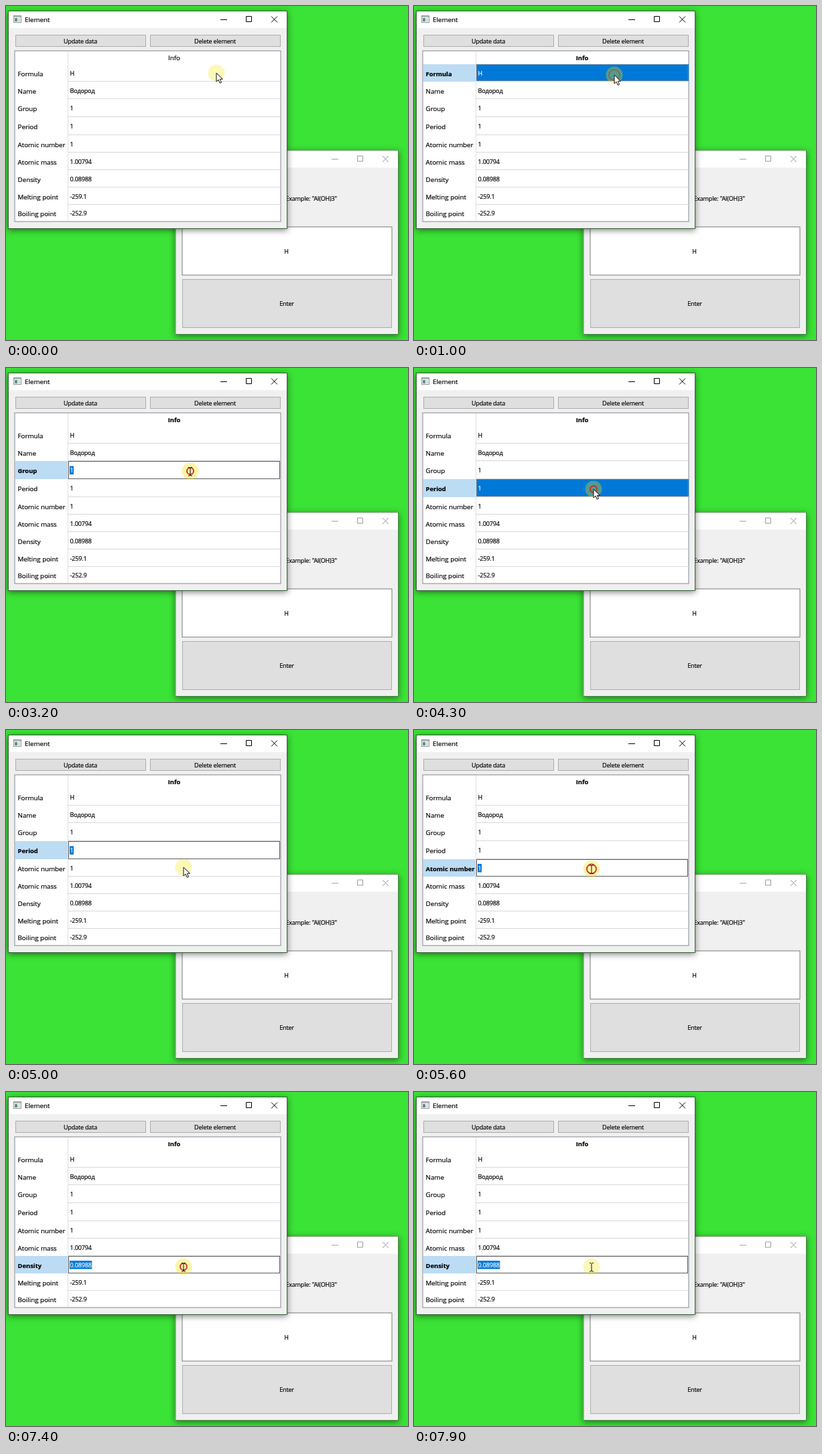
Recreate the animation shown at these times as an HTML page. Size 600 by 499 pixels, loop 8 s.

```html
<!DOCTYPE html>
<html lang="en">
<head>
<meta charset="utf-8">
<title>Element</title>
<style>
  html, body { margin: 0; width: 100%; height: 100%; overflow: hidden; background: #3ae335; }
  svg { display: block; width: 600px; height: 499px; }
  text {
    font: 9px "Open Sans", "Noto Sans", sans-serif; letter-spacing: -.15px; white-space: pre;
    color: #000; fill: currentColor; stroke: currentColor; stroke-width: .2px;
  }
  .head { font-size: 9.8px; letter-spacing: 0; }
  .head.bold { font-size: 9.4px; font-weight: 700; }
  .mid { text-anchor: middle; }
  .end { text-anchor: end; }
  .shadow { filter: drop-shadow(0 2px 5px rgba(0, 0, 0, .5)); }
</style>
</head>
<body>
<svg id="stage" viewBox="0 0 600 499"></svg>
<script>
const LOOP = 8000, STEP = 100, RING_TIME = 500;
const BLUE = '#0078d7';
const edges = [87, 113, 139, 166, 193, 219, 245, 271, 297, 322];
const rows = [
  ['Formula', 'H'], ['Name', 'Водород'], ['Group', '1'], ['Period', '1'],
  ['Atomic number', '1'], ['Atomic mass', '1.00794'], ['Density', '0.08988'],
  ['Melting point', '-259.1'], ['Boiling point', '-252.9']
];
// Per row: time of the selecting click, time of the click that opens the editor
const clicks = [[600, 1100], [1800, 2000], [2900, 3100], [4200, 4400], [5100, 5300], [6100, 6300], [7100, 7300]];
// Pointer path: time, x, y
const path = [
  [0, 314, 100], [500, 299, 103], [1200, 299, 103], [1700, 285, 127], [2300, 285, 127],
  [2800, 275, 154], [3400, 275, 154], [4000, 268, 181], [4500, 268, 181],
  [5000, 265, 205], [5500, 265, 205], [6000, 264.5, 229.5], [6600, 264.5, 229.5],
  [7000, 265, 261], [8000, 265, 261]
];

const stage = document.getElementById('stage');

function add(parent, tag, attrs = {}, text = '') {
  const el = document.createElementNS('http://www.w3.org/2000/svg', tag);
  set(el, attrs);
  if (text) el.textContent = text;
  return parent.appendChild(el);
}
function set(el, attrs) {
  for (const k in attrs) el.setAttribute(k, attrs[k]);
}
function show(el, on) {
  el.style.display = on ? '' : 'none';
}
const rect = (p, x, y, width, height, fill, stroke = 'none') =>
  add(p, 'rect', { x, y, width, height, fill, stroke });
const box = (p, x, y, w, h, fill, stroke) => rect(p, x + .5, y + .5, w - 1, h - 1, fill, stroke);
const label = (p, x, y, text, cls = '') => add(p, 'text', { x, y, class: cls }, text);
const line = (p, d, stroke, width = 1) =>
  add(p, 'path', { d, stroke, 'stroke-width': width, fill: 'none' });

function makeWindow(x, y, w, h, border, ink) {
  const g = add(stage, 'g');
  rect(g, x, y, w, h, '#f0f0f0').setAttribute('class', 'shadow');
  box(g, x, y, w, h, '#f0f0f0', border);
  rect(g, x + 1, y + 1, w - 2, 25, '#fff');
  const r = x + w, m = y + 13;
  line(g, `M${r - 100} ${m + .5}h10`, ink);
  line(g, `M${r - 61.5} ${m - 4.5}h8v8h-8z`, ink);
  line(g, `M${r - 24} ${m - 4.5}l9 9m0 -9l-9 9`, ink);
  return g;
}
function button(p, x, y, w, h, text) {
  box(p, x, y, w, h, '#e0dfe0', '#adadad');
  label(p, x + w / 2 - .5, y + h / 2 + 3.5, text, 'mid');
}

// Background window
const back = makeWindow(252.5, 215.5, 333.5, 275.5, '#4f7f4b', '#999');
label(back, 494, 291, 'Example: "Al(OH)3"', 'end');
box(back, 262.5, 329.5, 314, 73, '#fff', '#7a7a7a');
label(back, 418.5, 370, 'H', 'mid');
button(back, 263, 408, 313, 73, 'Enter');

// Front window
const front = makeWindow(3, 7, 417, 326, '#38603a', '#000');
box(front, 11, 14, 12, 11, '#f4f6f6', '#8d9696');
rect(front, 12, 15, 10, 2, '#b4bcbc');
rect(front, 13, 18, 4, 5, '#5f8f8a');
rect(front, 18, 18, 3, 5, '#d3d9d9');
label(front, 28, 24, 'Element', 'head');
button(front, 14, 43, 195, 18, 'Update data');
button(front, 215, 43, 195, 18, 'Delete element');
box(front, 12.5, 66.5, 398, 256, '#fff', '#828790');
line(front, 'M92.5 68V322', '#dedede');
const info = label(front, 251, 80.5, 'Info', 'head mid');

const cells = rows.map(([name, value], i) => {
  const y = edges[i], h = edges[i + 1] - y, base = y + h / 2 + 4;
  if (i < rows.length - 1) line(front, `M93 ${y + h - .5}H410`, '#d8d8d8');
  const tint = rect(front, 14, y, 78, h, '#bcdcf4');
  const chosen = add(front, 'g');
  rect(chosen, 93, y, 317, h - 1, BLUE);
  set(box(chosen, 93, y, 316, h - 1, 'none', '#ff8728'), { 'stroke-dasharray': '1 1', opacity: .6 });
  const editor = add(front, 'g');
  box(editor, 93, y, 316, h, '#fff', '#5c5c5c');
  const mark = rect(editor, 95, y + h / 2 - 6, 0, 12.5, BLUE);
  const head = label(front, 17.5, base + .5, name, 'head');
  const text = label(front, 95.5, base - .5, value);
  return { tint, chosen, editor, mark, head, text };
});

// Pointer
const pointer = add(stage, 'g');
const halo = add(pointer, 'circle', { r: 12.5, fill: '#f0e600' });
const ring = add(pointer, 'circle', { fill: 'none', stroke: '#c8242c', 'stroke-width': 2 });
const arrow = add(pointer, 'path', {
  d: 'M0 0V13L3 10.2L5.2 15.2L7.5 14.2L5.3 9.3H9.3Z', fill: '#fff', stroke: '#111', 'stroke-width': 1
});
const beam = line(pointer, 'M-3 -5.5H-1L0 -4.5L1 -5.5H3M0 -4.5V6M-3 7H-1L0 6L1 7H3', '#111');

function pointerAt(t) {
  let i = 1;
  while (i < path.length - 1 && path[i][0] < t) i++;
  const [t0, x0, y0] = path[i - 1], [t1, x1, y1] = path[i];
  const p = Math.min(1, (t - t0) / (t1 - t0)), e = p * p * (3 - 2 * p);
  return [x0 + (x1 - x0) * e, y0 + (y1 - y0) * e];
}

function draw(t) {
  const active = clicks.filter(c => c[0] <= t).length - 1;
  const editing = active >= 0 && clicks[active][1] <= t;
  info.classList.toggle('bold', active >= 0);
  cells.forEach((c, i) => {
    const on = i === active;
    show(c.tint, on);
    show(c.chosen, on && !editing);
    show(c.editor, on && editing);
    c.head.classList.toggle('bold', on);
    c.text.style.color = on ? '#fff' : '';
    if (on && editing) c.mark.setAttribute('width', c.text.getComputedTextLength() + 1);
  });

  const [x, y] = pointerAt(t);
  set(pointer, { transform: `translate(${x} ${y})` });
  const inside = editing && y > edges[active] && y < edges[active + 1];
  show(beam, inside);
  show(arrow, !inside);

  const last = clicks.flat().filter(c => c <= t).pop();
  const p = last === undefined ? 1 : (t - last) / RING_TIME;
  show(ring, p < 1);
  set(halo, { opacity: p < 1 ? .34 : .27 });
  if (p < 1) set(ring, { r: 4 + 5 * p, opacity: Math.min(.9, (1 - p) * 2.2) });
}

const start = performance.now();
function tick() {
  const t = (performance.now() - start) % LOOP;
  draw(Math.floor(t / STEP) * STEP);
  requestAnimationFrame(tick);
}
tick();
</script>
</body>
</html>
```
